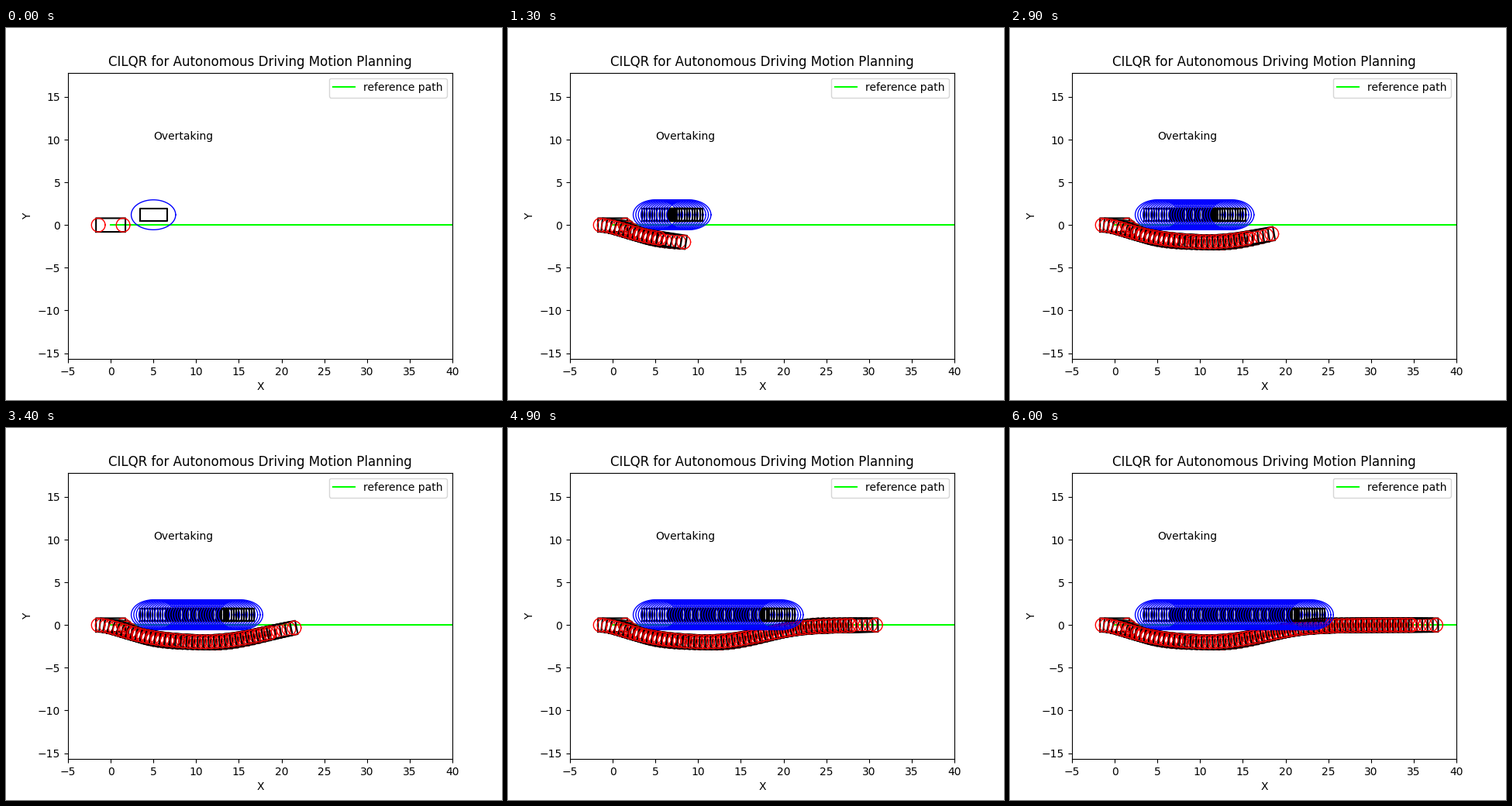
Animation of 640 by 480 pixels, one loop 6.1 s. Source, as a matplotlib script:

```python
import numpy as np
import matplotlib.pyplot as plt
from matplotlib.animation import FuncAnimation

FRAMES = 61
INTERVAL = 100

EGO_HALF = (1.72, .8)
AXLE = 1.45
RADIUS = .8
CAR_HALF = (1.6, .7)
CAR_START, CAR_Y, CAR_STEP = 5, 1.2, .3
SAFE_AXES = (2.6, 1.75)
DODGE = 2.1


def front_at(step):
    """Front axle: speeds up, slows in the turn, dips and comes back."""
    speed_up = 1.05 * (1 - np.exp(-step / 5))
    turn_lag = .25 * np.exp(-((step - 15) / 6) ** 2)
    gone = .62 * step - speed_up - turn_lag
    x = AXLE + gone
    dip = 1 - np.exp(-gone / 2.3)
    t = np.clip((x - 12) / 12.7, 0, 1)
    back = t * t * (3 - 2 * t)
    return np.array([x, DODGE * (back - dip)])


def ego_poses(substeps=10):
    """Centre and heading per step, the rear axle towed by the front one."""
    rear = np.array([-AXLE, 0.0])
    poses = []
    for i in range((FRAMES - 1) * substeps + 1):
        front = front_at(i / substeps)
        pull = front - rear
        pull /= np.hypot(*pull)
        rear = front - 2 * AXLE * pull
        if i % substeps == 0:
            poses.append((*(front + rear) / 2, np.arctan2(pull[1], pull[0])))
    return poses


def box(x, y, half, angle=0.0):
    u = np.array([-1, 1, 1, -1, -1]) * half[0]
    v = np.array([-1, -1, 1, 1, -1]) * half[1]
    c, s = np.cos(angle), np.sin(angle)
    return x + c * u - s * v, y + s * u + c * v


def oval(x, y, a, b):
    t = np.linspace(0, 2 * np.pi, 100)
    return x + a * np.cos(t), y + b * np.sin(t)


fig, ax = plt.subplots(figsize=(6.4, 4.8), dpi=100)
ax.plot([0, 60], [0, 0], color="lime", label="reference path")
ax.set_title("CILQR for Autonomous Driving Motion Planning")
ax.set_xlabel("X")
ax.set_ylabel("Y")
ax.text(5, 10, "Overtaking")
ax.legend(loc="upper right")

# Equal scale on both axes, centred on the traffic
half_height = 45 / 2 * 369.6 / 496
ax.set_xlim(-5, 40)
ax.set_ylim(1.075 - half_height, 1.075 + half_height)


def add_step(i, pose):
    """Lines of one time step, stacked over all earlier steps."""
    x, y, angle = pose
    dx, dy = AXLE * np.cos(angle), AXLE * np.sin(angle)
    car_x = CAR_START + CAR_STEP * i
    shapes = [
        (box(car_x, CAR_Y, CAR_HALF), "black", 1.5),
        (oval(car_x, CAR_Y, *SAFE_AXES), "blue", 1),
        (box(x, y, EGO_HALF, angle), "black", 1.5),
        (oval(x + dx, y + dy, RADIUS, RADIUS), "red", 1),
        (oval(x - dx, y - dy, RADIUS, RADIUS), "red", 1),
    ]
    return [ax.plot(*pts, color=color, lw=lw, visible=False,
                    scalex=False, scaley=False)[0]
            for pts, color, lw in shapes]


trail = [add_step(i, pose) for i, pose in enumerate(ego_poses())]


def update(frame):
    for i, lines in enumerate(trail):
        for line in lines:
            line.set_visible(i <= frame)
    return []


anim = FuncAnimation(fig, update, frames=FRAMES, interval=INTERVAL,
                     init_func=lambda: update(0), repeat=True, repeat_delay=0)
plt.show()
```
